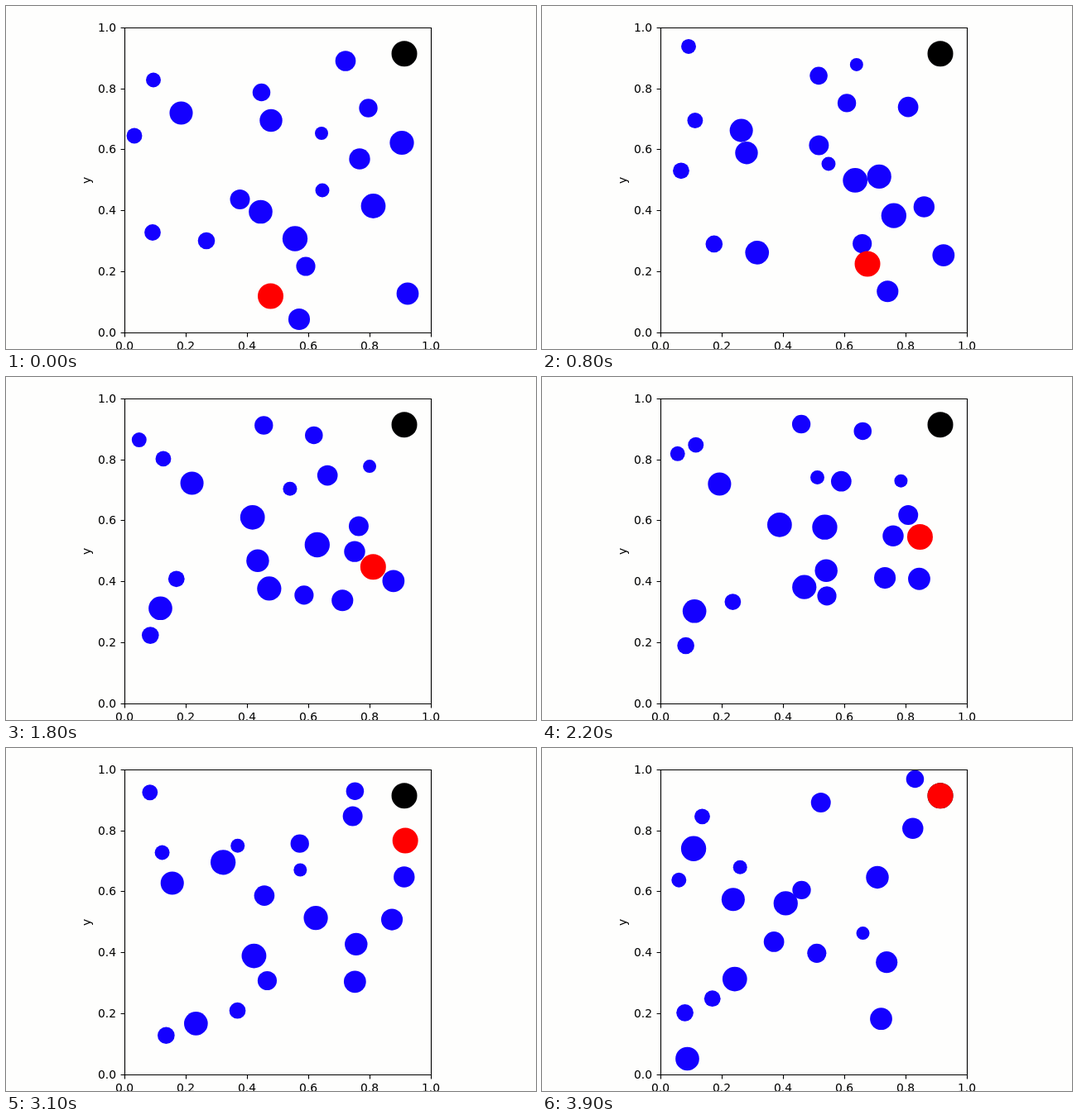
Animation, 640 px wide and 415 px high, one loop 4 s. Source, as an HTML page:

```html
<!DOCTYPE html>
<html lang="en">
<head>
<meta charset="utf-8">
<title>Moving obstacles</title>
<style>
  html, body { margin: 0; width: 100%; height: 100%; overflow: hidden; background: #fefefd; }
  svg { display: block; }
  text { font: 13.89px "DejaVu Sans", sans-serif; }
</style>
</head>
<body>
<svg id="plot" width="640" height="415" viewBox="0 0 640 415"></svg>
<script>
const plot = document.getElementById('plot');
const STEP = 100, STEPS = 40, TURN = 10;
const LEFT = 143.2, BOTTOM = 395.2, SIZE = 369.6;
const GOAL = { cx: 481, cy: 57.7, r: 15.5 };
const obstacles = [];

function add(tag, attrs, label = '') {
  const node = document.createElementNS('http://www.w3.org/2000/svg', tag);
  node.textContent = label;
  set(node, attrs);
  return plot.appendChild(node);
}

function set(node, attrs) {
  for (const name in attrs) node.setAttribute(name, attrs[name]);
}

// Obstacles are added from small to large, so the radius follows from the order
function obstacle(x, y, speed, ...headings) {
  const i = obstacles.length;
  const r = 8 + 0.5 * i - 0.0065 * i * i;
  obstacles.push({ node: add('circle', { r, fill: '#1400ff' }), x, y, speed, headings });
}

// Constant speed, with a new heading (degrees, clockwise) every TURN steps
function moveObstacle({ node, x, y, speed, headings }, step) {
  headings.forEach((degrees, leg) => {
    const distance = speed * Math.max(0, Math.min(TURN, step - leg * TURN));
    const angle = degrees * Math.PI / 180;
    x += distance * Math.cos(angle);
    y += distance * Math.sin(angle);
  });
  set(node, { cx: x, cy: y });
}

// The agent dodges along a few waypoints [step, x, y] and stops on the goal
const waypoints = [
  [0, 319.5, 351], [10, 411.4, 302.3], [14, 437, 270.5], [20, 446.5, 209.5],
  [27, 481.3, 153.5], [34, 482.8, 81], [36.3, GOAL.cx, GOAL.cy]
];

function moveAgent(step) {
  const next = Math.max(1, waypoints.findIndex(([time]) => time >= step));
  const last = step > waypoints.at(-1)[0] ? waypoints.length - 1 : next;
  const [t0, x0, y0] = waypoints[last - 1], [t1, x1, y1] = waypoints[last];
  const k = Math.min(1, (step - t0) / (t1 - t0));
  set(agent, { cx: x0 + (x1 - x0) * k, cy: y0 + (y1 - y0) * k });
}

obstacle(381, 154, 10.38, 269.2, 44.2, 171.5, 67.2);
obstacle(382, 223, 6.02, 221.6, 277.1, 188, 147.3);
obstacle(178, 89.5, 5.07, 268.6, 113.2, 46.8, 125);
obstacle(155, 157, 4.39, 328.3, 266.1, 245.8, 56);
obstacle(177, 274, 9.4, 263.1, 57.8, 39.1, 191.1);
obstacle(242, 284, 4.3, 173.4, 136.6, 49.5, 232.8);
obstacle(308.5, 104.5, 4.07, 321.8, 344.2, 339.6, 333.1);
obstacle(437.5, 123.5, 8.71, 185, 235.5, 47.8, 126.3);
obstacle(362, 315, 4.62, 311.9, 206.9, 145.9, 296.3);
obstacle(282.5, 234, 10.44, 308.4, 19.8, 260.8, 191.3);
obstacle(410, 66.5, 8.03, 60, 195.3, 135, 119.7);
obstacle(427, 185, 8.43, 59.4, 223.5, 334.6, 240.7);
obstacle(354, 379, 8.97, 331.9, 248, 324.2, 134);
obstacle(485, 348, 5.8, 269.8, 248.6, 134.7, 104.8);
obstacle(320, 138.5, 10.36, 151.8, 24.8, 9.2, 257.6);
obstacle(211.5, 129.5, 4.5, 35.9, 229.5, 118.9, 33.2);
obstacle(307.5, 249, 8.58, 134.1, 206.7, 40.8, 141.7);
obstacle(478, 165.5, 10.22, 150, 151.2, 325.4, 192.5);
obstacle(443.5, 242, 9.04, 205.4, 207.5, 73.2, 157.2);
obstacle(349, 281.5, 10.1, 339.8, 212.7, 210.8, 191.8);

add('circle', GOAL);
const agent = add('circle', { r: GOAL.r, fill: '#f00' });

// Axes
const line = d => add('path', { d, fill: 'none', stroke: '#000', 'stroke-width': 1.11 });
line('M143.5 26.5H513.5V395.5H143.5Z');
for (let i = 0; i <= 5; i++) {
  const x = Math.round(LEFT + SIZE * i / 5), y = Math.round(BOTTOM - SIZE * i / 5);
  const label = (i / 5).toFixed(1);
  line(`M${x + 0.5} 395.5v4.9M143.5 ${y + 0.5}h-4.9`);
  add('text', { x, y: 416, 'text-anchor': 'middle' }, label);
  add('text', { x: 133.1, y: y + 5, 'text-anchor': 'end' }, label);
}
add('text', { transform: 'translate(102 211) rotate(-90)', 'text-anchor': 'middle' }, 'y');

function draw() {
  const step = Math.floor(performance.now() / STEP) % STEPS;
  obstacles.forEach(o => moveObstacle(o, step));
  moveAgent(step);
  requestAnimationFrame(draw);
}
draw();
</script>
</body>
</html>
```
